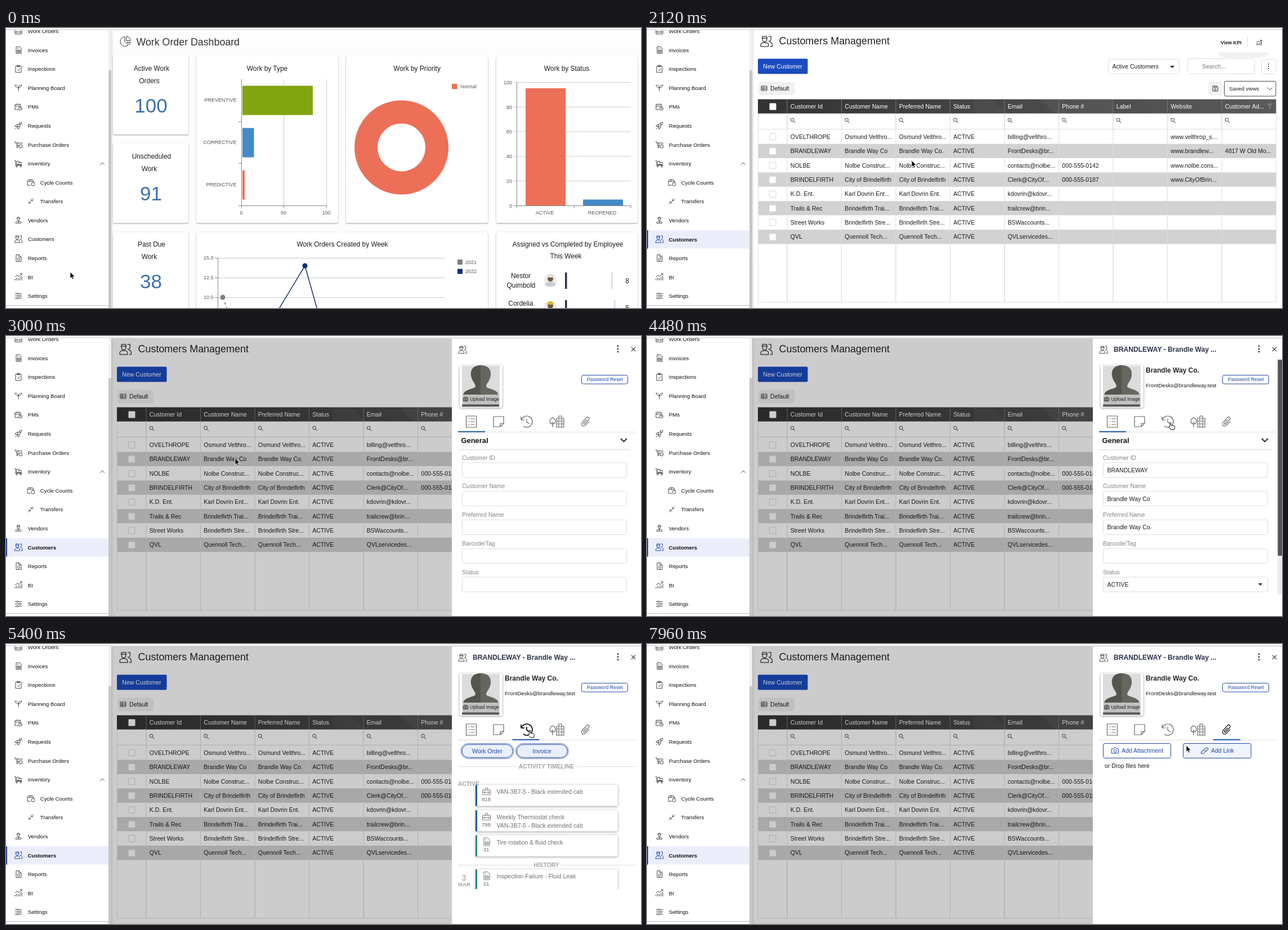
An HTML page for the animation above (8 s loop, 1128 by 497 pixels).

```html
<!DOCTYPE html>
<html lang="en">
<head>
<meta charset="utf-8">
<title>Customer dashboard</title>
<style>
html, body { margin: 0; width: 100%; height: 100%; overflow: hidden; background: #fff; }
svg { display: block; width: 1128px; height: 497px; font-family: "Liberation Sans", Arial, Helvetica, sans-serif; }
.card { filter: drop-shadow(0 1px 1.2px rgba(0,0,0,.38)); }
.soft { filter: drop-shadow(0 1px 2px rgba(0,0,0,.4)); }
</style>
</head>
<body>
<svg id="stage" viewBox="0 0 1128 497"></svg>
<script>
const stage = document.getElementById('stage');

// Markup helpers
const rect = (x, y, w, h, fill, more = '') =>
  `<rect x="${x}" y="${y}" width="${w}" height="${h}" fill="${fill}" ${more}/>`;
const text = (x, y, s, size = 10.5, fill = '#1c1c1c', more = '') =>
  `<text x="${x}" y="${y}" font-size="${size}" fill="${fill}" ${more}>${s.replaceAll('&', '&amp;')}</text>`;
const mid = (x, y, s, size, fill, more = '') => text(x, y, s, size, fill, 'text-anchor="middle" ' + more);
const end = (x, y, s, size, fill) => text(x, y, s, size, fill, 'text-anchor="end"');
const line = (d, color = '#ccc', w = 1, more = '') =>
  `<path d="${d}" fill="none" stroke="${color}" stroke-width="${w}" ${more}/>`;
const shape = (d, fill) => `<path d="${d}" fill="${fill}"/>`;
const ring = (x, y, r) => `M${x - r} ${y}a${r} ${r} 0 1 0 ${2 * r} 0a${r} ${r} 0 1 0 ${-2 * r} 0`;
const icon = (x, y, d, { k = 1, color = '#444', w = 1, turn = 0 } = {}) =>
  `<g transform="translate(${x} ${y}) rotate(${turn}) scale(${k})">${line(d, color, w / k, 'stroke-linejoin="round"')}</g>`;
const group = (id, body) => `<g id="${id}">${body}</g>`;
const outline = (color, r = 3) => `stroke="${color}" rx="${r}"`;
const BOLD = 'font-weight="bold"';
const BLUE = '#2448a6';

const I = {
  work: 'M-6-2H6V5H-6ZM-2-2V-5H2V-2M-6 1.5H6M-3 0V3M3 0V3',
  doc: 'M-4-6H2L5-3V6H-4ZM-2-3H0M-2 0H3V4H-2ZM-2 2H3',
  clip: 'M-5-5H5V6H-5ZM-2-6.5H2V-4H-2ZM-2 1L0 3L3-1',
  plant: 'M0 6V0C-4 0-5-2-6-5C-2-5 0-3 0 0C0-3 3-5 6-5C5-2 3 0 0 0',
  plan: 'M4-1V-4H-6V5H0M-6-1H4M-3-6V-4M1-6V-4' + ring(3.5, 3, 3) + 'M3.5 1V3H5',
  rocket: 'M-2 2C-1-3 2-6 6-6C6-2 3 1-2 2ZM-2 2L-6 6M-1-2H-4L-6 1H-2M2 1V4L-1 6V2' + ring(2.5, -2.5, 1),
  cart: 'M-7-5H-5L-3 2H2M-4-3H6V-1M-1-3V2' + ring(-2, 4.5, 1.2) + ring(4, 3, 3),
  truck: 'M-7-5H-5V3H7M-3-4H1V2H-3ZM1-2H5V2H1' + ring(-3, 5, 1.3) + ring(4, 5, 1.3),
  box: 'M-6-2L-4-5H3L5-2V1M-6-2H5M-6-2V5H0M-1-5V-2' + ring(4, 3, 3),
  move: 'M-5 5L-1 1M-1 4V1H-4M5-5L1-1M1-4V-1H4',
  vendor: ring(0, -3, 2.6) + 'M-3-4H3M-5 5C-5 0 5 0 5 5ZM-1 2L0 4L1 2',
  people: 'M-5.5-3.8H1.5M-4.5-4V-6H.5V-4M-4.5-3.5V-2a2.5 2.5 0 0 0 5 0V-3.5M-6.5 6V4C-6.5 .5 2.5 .5 2.5 4V6Z' +
    'M2.5-6H5.5V-2.5a2 2 0 0 1-3 2M4 .8C7 1 7 3 7 6H4.5',
  report: 'M1-6H-4V6H5V-2L1-6V-2H5' + ring(0.5, 2, 2),
  chart: 'M-6 6V3M-3 6V1M0 6V2M3 6V0M6 6V-2M-6 0L-2-3L1-1L6-6M3-6H6V-3',
  tune: 'M-6-4H-3M0-4H6M-6 0H1M4 0H6M-6 4H-3M0 4H6' + ring(-1.5, -4, 1.5) + ring(2.5, 0, 1.5) + ring(-1.5, 4, 1.5),
  find: ring(-1, -1, 3) + 'M1.3 1.3L4.5 4.5',
  grid: 'M-5-4H5V4H-5ZM-5-1H5M-5 1.5H5M-1.5-4V4',
  save: 'M-4.5-4.5H3L4.5-3V4.5H-4.5ZM-2-4V-2H2V-4' + ring(0, 1.5, 1.5),
  pie: 'M-1-8A8.5 8.5 0 1 0 5 7L-1 1ZM2-9A8 8 0 0 1 9-1H2ZM3 2H9A8 8 0 0 1 7 6Z',
  list: 'M-9-10H9V10H-9ZM-5-5H-3M-5 0H-3M-5 5H-3M-1-5H6M-1 0H6M-1 5H6',
  note: 'M-9-9H9V3L3 9H-9ZM9 3H3V9',
  past: 'M-10-9V-3H-4M-9.5-3A10 10 0 1 1-6 8M0-5V1L5 4',
  town: 'M0 10V-6H4V-10H9V-6H13V10ZM4-6V10M9-6V10M6.5-7V-5M6.5-2V0M6.5 3V5M2-2V0M2 3V5M11-2V0M11 3V5M-7 10V0M-7-7C-14-4-13 4-7 4C-1 4 0-4-7-7Z',
  pin: 'M4.5-5V6a4.5 4.5 0 0 1-9 0V-7a3 3 0 0 1 6 0V5a1.5 1.5 0 0 1-3 0V-4',
  link: 'M-1-2.5H-5a2.5 2.5 0 0 0 0 5H-1a2.5 2.5 0 0 0 2.5-2.5M1 2.5H5a2.5 2.5 0 0 0 0-5H1a2.5 2.5 0 0 0-2.5 2.5',
  camera: 'M-6-3H-3L-2-5H2L3-3H6V5H-6Z' + ring(0, 1, 2.4)
};

function sidebar() {
  const items = [['Work Orders', 'work'], ['Invoices', 'doc'], ['Inspections', 'clip'], ['Planning Board', 'plant'],
    ['PMs', 'plan'], ['Requests', 'rocket'], ['Purchase Orders', 'cart'], ['Inventory', 'truck'],
    ['Cycle Counts', 'box', 22], ['Transfers', 'move', 22], ['Vendors', 'vendor'], ['Customers', 'people'],
    ['Reports', 'report'], ['BI', 'chart'], ['Settings', 'tune']];
  const list = items.map(([name, key, dx = 0], i) => {
    const y = 5.6 + i * 33.57;
    return icon(22 + dx, y, I[key]) + text(38.7 + dx, y + 3.5, name, 9.7, '#111');
  }).join('');
  return rect(0, 0, 187, 497, '#fff') + list + line('M167 243L171 239L175 243', '#555') +
    group('hover', rect(14, 366, 16, 18, '#fff') + icon(22, 375, I.people, { color: BLUE })) +
    group('picked', rect(0, 359, 182, 32.5, '#ebeefa') + rect(0, 359, 2, 32.5, BLUE) +
      icon(22, 375, I.people, { color: BLUE }) + text(38.5, 378.5, 'Customers', 9.7, '#111', BOLD)) +
    rect(182, 4, 5, 71, '#f0f0f0') + rect(182, 75, 5, 422, '#c6c6c6') + line('M0 492.5H183', '#bbb') +
    rect(187, 4, 4, 493, 'url(#edge)');
}

function dashboard() {
  const card = (x, y, w, h) => rect(x, y, w, h, '#fff', 'rx="2" class="card"');
  const stat = (y, a, b, n) => mid(258.5, y, a, 11.9) + mid(254.5, y + 21.5, b, 11.9) + mid(257.5, y + 74, n, 35, '#3b73ac');
  const head = (x, y, s) => mid(x, y, s, 11.9);
  const tag = (x, y, s) => mid(x, y, s, 9, '#555');
  const tagEnd = (x, y, s) => end(x, y, s, 9, '#555');
  const RED = '#ec7057', SKY = '#4489c8', NAVY = '#0e2f80', AXIS = '#888';
  let s = rect(187, 0, 941, 497, '#fdfdfd') + icon(212, 23.5, I.pie, { color: '#333' }) + text(231.5, 31, 'Work Order Dashboard', 17.8, '#333');
  s += card(190, 50, 134, 139) + card(190, 205, 134, 141) + card(190, 363, 134, 150) + card(338, 50, 252, 296) +
    card(604, 50, 252, 296) + card(871, 50, 251, 296) + card(338, 363, 518, 150) + card(871, 363, 251, 150);
  s += stat(76, 'Active Work', 'Orders', '100') + stat(232, 'Unscheduled', 'Work', '91') + stat(388, 'Past Due', 'Work', '38');

  s += head(464, 76, 'Work by Type') + line('M493.5 91V315M569.5 91V315') +
    line('M418.5 91V320M413 166.5H418M413 240.5H418M413 315.5H569.5V320M493.5 315V320', AXIS);
  [['PREVENTIVE', 125, '#82a50f'], ['CORRECTIVE', 20.5, SKY], ['PREDICTIVE', 4, RED]].forEach(([name, w, c], i) => {
    s += rect(420, 102.5 + i * 75, w, 52, c) + tagEnd(409.5, 131.3 + i * 75, name);
  });
  s += tag(418, 331, '0') + tag(493, 331, '50') + tag(569, 331, '100');

  s += head(730, 76, 'Work by Priority') + rect(792, 99, 9.5, 9.5, RED) + text(807, 107, 'Normal', 8.9, '#555') +
    `<circle cx="702.5" cy="212" r="63" fill="none" stroke="${RED}" stroke-width="41"/>`;

  s += head(996, 76, 'Work by Status');
  for (let i = 0; i < 6; i++) {
    const y = 315.5 - i * 43.8;
    s += line(`M902 ${y}H1110`, i ? '#ccc' : AXIS) + tagEnd(899, y + 3.2, '' + i * 20);
  }
  s += line('M907.5 96V320M1009.5 315V320M1110 315V320', AXIS) + rect(923, 107, 71, 208, RED) + rect(1025, 304.5, 71, 10.5, SKY) +
    tag(957, 331, 'ACTIVE') + tag(1059, 331, 'REOPENED');

  s += head(597.5, 388, 'Work Orders Created by Week') +
    line('M376 408.5H780M376 443.5H780M376 478.5H780') + line('M376.5 408V497M371 408.5H376M371 443.5H376M371 478.5H376', AXIS);
  ['15.0', '12.5', '10.0'].forEach((v, i) => s += tagEnd(368.5, 411.3 + i * 35, v));
  s += line('M385 478L394 502', '#777', 1.5, 'stroke-dasharray="5 4"') + line('M484 500L531 422L553 500', '#142a60', 1.5) +
    shape(ring(385, 478, 4.5), '#7f7f7f') + shape(ring(531, 422, 4.5), NAVY) +
    rect(802, 411, 9, 9, '#7f7f7f') + rect(802, 427.5, 9, 9, NAVY) + text(816, 419, '2021', 9, '#555') + text(816, 435.3, '2022', 9, '#555');

  const face = (y, cap, coat) => shape(ring(967, y, 12), '#eef0ec') + shape(ring(967, y - 3, 5), '#70543f') +
    shape(`M961 ${y - 5}a6 6 0 0 1 12 0Z`, cap) + shape(`M957 ${y + 8}C960 ${y} 974 ${y} 977 ${y + 8}L971 ${y + 11}H963Z`, coat);
  s += head(998, 388, 'Assigned vs Completed by Employee') + head(994.5, 409, 'This Week') +
    head(914.5, 444, 'Nestor') + head(915, 461, 'Quimbold') + head(914.5, 493, 'Cordelia') +
    face(448, '#ddd', '#c9ced0') + face(496, '#e0b22e', '#777') +
    rect(993, 434, 3.5, 29, '#28304f') + rect(993, 483, 3.5, 20, '#28304f') +
    rect(1075, 434, 2.5, 29, '#d5dbe8') + rect(1080, 483, 2.5, 20, '#d5dbe8') + head(1103.5, 452.5, '8') + head(1103.5, 500.5, '5');
  return s;
}

const cols = [249, 345.5, 442, 538.5, 635, 731.5, 828, 924.5, 1021];

function customers() {
  let s = rect(187, 0, 941, 497, '#fff') + icon(212, 23.8, I.people, { k: 1.5, color: '#333', w: 1.3 }) +
    text(234.5, 29, 'Customers Management', 17.95, '#222');
  s += shape('M1015 43H1104Q1101 53 1090 53H1029Q1018 53 1015 43Z', '#f1f1f1') + text(1019, 28.5, 'View KPI', 8.8, '#222', BOLD) +
    line('M1066.5 16V33', '#ddd') + icon(1087, 26, I.chart, { k: .75, color: '#333' });
  s += rect(197, 54.5, 88.5, 27, '#1a4bc0', 'rx="2"') + text(206.3, 72, 'New Customer', 10.5, '#fff') +
    rect(819.5, 55.5, 126, 26, '#fff', outline('#ddd')) + text(826.5, 72, 'Active Customers') + shape('M929 67H937L933 71Z', '#222') +
    rect(960.5, 54.5, 119, 27, '#fff', outline('#ddd')) + text(986, 72, 'Search...', 10.5, '#777') +
    rect(1091.5, 55.5, 26, 26, '#fff', outline('#ddd')) + [64, 68, 72].map(y => shape(ring(1104, y, 1), '#333')).join('');
  s += rect(198, 95.5, 64, 24, '#f0f0f0', 'rx="5"') + icon(208, 107, I.grid) + text(219, 111.3, 'Default', 10.6) +
    rect(997, 95, 24.5, 25, '#f2f2f2', 'rx="4"') + icon(1009.5, 107.5, I.save, { color: '#333' }) +
    rect(1025.5, 94.5, 91.5, 26.5, '#fff', outline('#444')) + text(1034, 111.3, 'Saved views', 9.5) + line('M1102 105.5L1106.5 110L1111 105.5', '#333');
  s += rect(197, 126.5, 920.5, 25.2, 'url(#bar)') + shape('M580 127H612L640 152H580Z', '#ffffff08') + shape('M700 127L724 152H828V127Z', '#ffffff0a') +
    rect(217.5, 133.5, 12, 12, '#fff', 'rx="1"') + shape('M1101 134H1112L1108 139V144H1105V139Z', '#777');
  const names = ['Customer Id', 'Customer Name', 'Preferred Name', 'Status', 'Email', 'Phone #', 'Label', 'Website', 'Customer Ad...'];
  cols.forEach((x, i) => {
    s += text(x + 5.8, 143, names[i], 10.5, '#fff') + icon(x + 10, 164, I.find, { k: .95, color: '#555' }) + line(`M${x} 127V152`, '#777');
  });
  return s + line('M197 179.5H1117.5', '#ddd') + line('M197 487H1117.5', '#ddd') + cellLines();
}

const cellLines = () => line([197.5, ...cols, 1117.5].map(x => `M${x} 152V487`).join(''), '#dcdcdc');

function rows() {
  const data = [
    'OVELTHROPE|Osmund Velthro...|Osmund Velthro...|billing@velthro...||www.velthrop_s...|',
    'BRANDLEWAY|Brandle Way Co|Brandle Way Co.|FrontDesks@br...||www.brandlew...|4817 W Old Mo...',
    'NOLBE|Nolbe Construc...|Nolbe Construc...|contacts@nolbe...|000-555-0142|www.nolbe.cons...|',
    'BRINDELFIRTH|City of Brindelfirth|City of Brindelfirth|Clerk@CityOf...|000-555-0187|www.CityOfBrin...|',
    'K.D. Ent.|Karl Dovrin Ent...|Karl Dovrin Ent.|kdovrin@kdovr...|||',
    'Trails & Rec|Brindelfirth Trai...|Brindelfirth Trai...|trailcrew@brin...|||',
    'Street Works|Brindelfirth Stre...|Brindelfirth Stre...|BSWaccounts...|||',
    'QVL|Quennoll Tech...|Quennoll Tech...|QVLservicedes...|||'];
  let s = '';
  data.forEach((row, i) => {
    const y = 193 + i * 25.38, cells = row.split('|');
    cells.splice(3, 0, 'ACTIVE');
    cells.splice(6, 0, '');
    s += rect(197, y - 12.7, 920.5, 25.4, i % 2 ? '#d2d2d2' : '#fff') + rect(217.5, y - 5.5, 11.5, 11.5, '#fff', outline(i % 2 ? '#e6e6e6' : '#d5d5d5', 1));
    cells.forEach((c, j) => { if (c) s += text(cols[j] + 5.8, y + 3.8, c); });
  });
  return s + cellLines();
}

function panel() {
  const faint = '#858585', gray = '#a4a4a4';
  let s = rect(792, 4.5, 340, 493, '#fff') + icon(811, 24.5, I.people, { k: 1.05 }) +
    [18, 23, 28].map(y => shape(ring(1087, y, 1.4), '#333')).join('') + line('M1111 20L1118 27M1118 20L1111 27', '#444', 1.2);
  s += rect(806, 52, 75.5, 75, '#fff', 'rx="3" class="soft"') + rect(810, 53, 67, 72, '#dcdcdc') +
    shape('M843 52C828 52 825 62 826 70C827 79 833 83 834 89C833 95 814 93 812 105V122H875V105C873 93 854 95 853 89C854 83 860 79 861 70C862 62 859 52 843 52Z', 'url(#figure)') +
    rect(810, 104, 67, 18, '#d2d2d2', 'opacity=".85"') + rect(810, 121.5, 66, 4, '#555') +
    icon(816.5, 112, I.camera, { k: .65, color: '#222' }) + text(824.3, 115, 'Upload Image', 8.3);
  s += group('who', text(829, 27.5, 'BRANDLEWAY - Brandle Way ...', 12.1, '#2a3048', BOLD) + text(886, 65, 'Brandle Way Co.', 12, '#222', BOLD) +
    text(886, 91.3, 'FrontDesks@brandleway.test', 9.6));
  s += rect(1022.5, 69.5, 82, 15.5, '#fff', outline(BLUE)) + mid(1063.7, 80.2, 'Password Reset', 8.8, BLUE);

  const tab = (x, d) => icon(x, 152, d, { color: '#666', w: 1.2 });
  const pin = (color, w) => icon(1030, 152, I.pin, { k: .9, color, w, turn: 42 });
  s += group('chip', rect(1006, 134, 47, 36.5, '#e4e4e4', 'rx="16"')) + tab(826.5, I.list) + tab(875, I.note) + tab(925, I.past) + tab(978, I.town) +
    group('pinLight', pin('#666', 1.2)) + group('pinDark', pin('#222', 1.4)) +
    group('pastDark', icon(925, 152, I.past, { color: '#111', w: 1.6 })) +
    line('M803 170.5H1118', '#ddd');

  // General form
  let form = text(808.5, 190, 'General', 12.9, '#111', BOLD) + line('M1092 182L1097.5 187.5L1103 182', '#222', 1.8) +
    rect(803, 201, 307, 1.5, '#e2e2e2'), values = '';
  [['Customer ID', 'BRANDLEWAY'], ['Customer Name', 'Brandle Way Co'], ['Preferred Name', 'Brandle Way Co.'], ['Barcode/Tag', ''], ['Status', 'ACTIVE']]
    .forEach(([name, v], i) => {
      const y = 225 + i * 50.75;
      form += text(810, y - 5.5, name, 10.5, faint) + rect(810.5, y, 292, 26, '#fff', outline('#ddd'));
      values += text(817.5, y + 16.8, v);
    });
  values += shape('M1086 439H1093L1089.5 443Z', '#222') + rect(1120, 42, 8, 416, '#ececec') + rect(1120.5, 42, 7.5, 348, '#555');
  s += group('form', form + group('values', values));

  // Activity timeline
  const pill = (x, w, name) => rect(x + .5, 176.5, w - 1, 27, '#e9effc', outline('#5f78bf', 13.5)) +
    rect(x + 2.5, 178.5, w - 5, 23, '#e9effc', outline('#3653a5', 11.5)) + mid(x + w / 2, 193.8, name, 10.5, BLUE);
  s += group('timeline', pill(807.5, 95, 'Work Order') + pill(905, 94.5, 'Invoice') + mid(960, 221, 'ACTIVITY TIMELINE', 10.4, gray, BOLD) +
    line('M803 217.5H907M1014 217.5H1118', '#ddd'));
  const entry = (y, h, color, key, no, ...lines) => rect(834, y, 252.5, h, '#fff', 'rx="2" class="soft"') + rect(834, y, 3, h, color) +
    icon(853.5, y + 11.5, I[key], { k: 1.15, color: '#777' }) + mid(853, y + 28.5, no, 9.6, '#666') +
    lines.map((l, i) => text(871.5, y + 16 + i * 14.7, l, 10.5, '#707070')).join('');
  const van = 'VAN-3B7-5 - Black extended cab', deep = '#0c5fa5', teal = '#268c85';
  s += group('cards', text(803, 251.5, 'ACTIVE', 10.4, gray, BOLD) + entry(250, 37.5, deep, 'work', '818', van) +
    entry(295, 37.5, deep, 'work', '798', 'Weekly Thermostat check', van) + entry(339.5, 37.5, teal, 'doc', '31', 'Tire rotation & fluid check') +
    line('M803 392.5H934M986 392.5H1118', '#ddd') + mid(960, 396, 'HISTORY', 10.4, gray, BOLD) +
    mid(813.5, 420, '3', 14, '#999') + mid(814, 430, 'MAR', 9.6, gray, BOLD) +
    entry(400, 42, teal, 'doc', '21', 'Inspection Failure - Fluid Leak') + rect(800, 435, 318, 20, '#fff'));

  // Attachments
  s += group('files', rect(810.5, 176.5, 120, 26, '#fff', outline(BLUE)) + icon(831.5, 189, I.camera, { color: BLUE }) + text(843, 193, 'Add Attachment', 10.5, BLUE) +
    rect(952.5, 176.5, 120.5, 26, '#fff', outline(BLUE) + ' id="linkBox"') + icon(990.5, 189.5, I.link, { k: .95, color: BLUE, turn: -38 }) +
    text(1002, 193, 'Add Link', 10.5, BLUE) + text(813, 220, 'or Drop files here', 10.4));
  return s + rect(803, 168.8, 48, 2.2, '#2f62b0', 'id="ink"');
}

const arrow = '<path id="arrow" d="M0 0V11.5L2.6 9.2L4.5 13.2L6.4 12.3L4.6 8.5H8.2Z" fill="#000" stroke="#fff" stroke-width=".8"/>';
const hand = '<path id="hand" d="M0 1C0-.4 2-.4 2 1V5L7.5 6.2Q9 6.6 8.7 8.5L7.8 13H2.2L-1.6 8.2C-2.2 7-.8 6.4 0 7.5Z" fill="#fff" stroke="#111" stroke-width="1"/>';

stage.innerHTML = `<defs>
  <linearGradient id="bar"><stop stop-color="#333"/><stop offset=".5" stop-color="#484848"/><stop offset="1" stop-color="#5a5a5a"/></linearGradient>
  <linearGradient id="figure"><stop offset=".5" stop-color="#55554f"/><stop offset=".5" stop-color="#66665f"/></linearGradient>
  <linearGradient id="edge"><stop stop-opacity=".1"/><stop offset="1" stop-opacity="0"/></linearGradient></defs>` +
  group('dash', dashboard()) + group('cust', customers() + group('rows', rows())) +
  group('shade', rect(187, 3, 941, 494, '#000', 'opacity=".2"')) + group('panel', panel()) + sidebar() +
  rect(0, 0, 1128, 2, '#fff') + rect(0, 2, 1128, 2, '#e3e3e3') + group('cursor', arrow + hand);

// Motion
const $ = id => document.getElementById(id);
const clamp = p => Math.max(0, Math.min(1, p));
const span = (t, a, b) => clamp((t - a) / (b - a));
const ease = p => p * p * (3 - 2 * p);
const show = (id, on) => { $(id).style.display = on ? '' : 'none'; };

const stops = [[0, 114, 433], [40, 114, 433], [560, 62, 355], [800, 58, 368], [1080, 58, 368], [1640, 482, 321], [1880, 482, 321],
  [2120, 470, 235], [2440, 392, 203], [2680, 407, 217], [3160, 407, 217], [3480, 700, 217], [3720, 700, 217],
  [4520, 930.5, 153], [4600, 929.5, 153], [6200, 929.5, 153], [6720, 1029, 154], [7640, 1029, 154], [7960, 958, 180], [8000, 958, 180]];

function pointer(t) {
  const i = stops.findIndex(s => s[0] > t), [t0, x0, y0] = stops[i - 1], [t1, x1, y1] = stops[i];
  const p = ease(span(t, t0, t1));
  return [x0 + (x1 - x0) * p, y0 + (y1 - y0) * p];
}

function draw(t) {
  show('hover', t >= 480 && t < 960);
  show('picked', t >= 960);
  show('dash', t < 1040);
  show('cust', t >= 1040);
  show('rows', t >= 1360);

  const open = t >= 2760;
  show('shade', open);
  show('panel', open);
  $('panel').setAttribute('transform', `translate(${323 * (1 - span(t, 2760, 3000)) ** 2} 0)`);
  show('who', t >= 3240);
  show('values', t >= 3240);
  show('form', t < 4800);
  show('timeline', t >= 4800 && t < 7040);
  show('cards', t >= 5040 && t < 6720);
  $('cards').setAttribute('opacity', span(t, 5000, 5360));
  show('files', t >= 7080);
  show('chip', t >= 6640 && t < 7000);
  show('pastDark', t >= 4760 && t < 6320);
  show('pinDark', t >= 6640);
  show('pinLight', t < 6640);
  $('linkBox').setAttribute('fill', t >= 7840 ? '#eef3fc' : '#fff');
  $('ink').setAttribute('x', 803 + 96.5 * ease(span(t, 4760, 5000)) + 106.5 * ease(span(t, 7040, 7280)));

  const pointing = t >= 560 && t < 1160 || t >= 4360 && t < 7720;
  show('hand', pointing);
  show('arrow', !pointing);
  $('cursor').setAttribute('transform', `translate(${pointer(t)})`);
}

const start = performance.now();
function tick() {
  draw((performance.now() - start) % 8000);
  requestAnimationFrame(tick);
}
tick();
</script>
</body>
</html>
```
